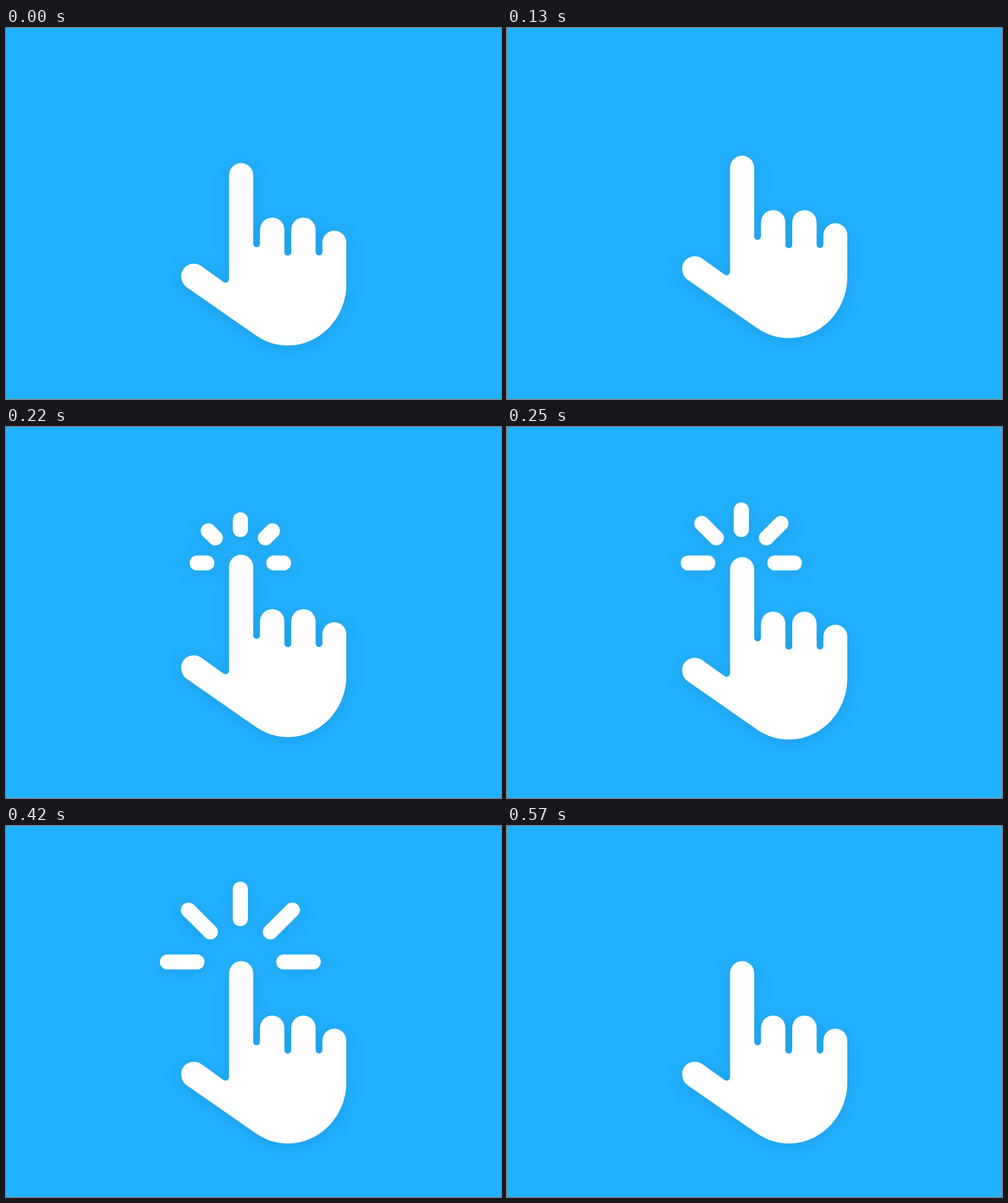
Recreate the animation shown at these times as an HTML page. Size 800 by 600 pixels, loop 1.37 s.

```html
<!DOCTYPE html>
<html lang="en">
<head>
<meta charset="utf-8">
<title>Tap</title>
<style>
html, body { margin: 0; width: 100%; height: 100%; overflow: hidden; background: #22b1ff; }
svg { display: block; width: 100%; height: 100%; }
.art { fill: #fff; filter: drop-shadow(0 4px 14px rgba(0, 10, 40, .11)); }
.hand { animation: press 1370ms step-end infinite; }

/* --n: length step, --m: outward shift, --q: inner end trimmed */
.rays { --n: 0; --m: 0; --q: 0; opacity: 0; animation: burst 1370ms step-end infinite; }
.rays rect {
  --len: calc(8px + 16px * var(--n));
  --in: calc(42px + 8px * var(--m) + 16px * var(--q));
  x: -12.2px;
  width: 24.4px;
  y: calc(0px - var(--in) - var(--len));
  height: var(--len);
  rx: min(12px, var(--len) / 2);
}
.rays .diag {
  --len: calc(6.3px + 17px * var(--n));
  --in: calc(45.2px + 5.65px * var(--m) + 17px * var(--q));
}

@keyframes press {
  0% { transform: translateY(0); }
  5.109% { transform: translateY(-4px); }
  7.299% { transform: translateY(-8px); }
  9.489% { transform: translateY(-12px); }
  18.248% { transform: translateY(-8px); }
  23.357% { transform: translateY(-4px); }
  28.467%, 100% { transform: translateY(0); }
}
@keyframes burst {
  0% { opacity: 0; --n: 0; --m: 0; --q: 0; }
  11.678% { opacity: 1; --n: 0; --m: 0; --q: 0; }
  13.868% { opacity: 1; --n: 1; --m: 0; --q: 0; }
  16.058% { opacity: 1; --n: 2; --m: 0; --q: 0; }
  18.248% { opacity: 1; --n: 3; --m: 0; --q: 0; }
  23.357% { opacity: 1; --n: 4; --m: 0; --q: 0; }
  28.467% { opacity: 1; --n: 4; --m: 1; --q: 0; }
  30.656% { opacity: 1; --n: 4; --m: 2; --q: 0; }
  32.846% { opacity: 1; --n: 3; --m: 2; --q: 1; }
  35.036% { opacity: 1; --n: 2; --m: 2; --q: 2; }
  37.226% { opacity: 1; --n: 1; --m: 2; --q: 3; }
  39.416% { opacity: 1; --n: 0; --m: 2; --q: 4; }
  41.605%, 100% { opacity: 0; --n: 0; --m: 2; --q: 4; }
}
</style>
</head>
<body>
<svg viewBox="0 0 800 600">
  <g class="art">
    <g class="rays">
      <g transform="translate(378.75 219.9)">
        <rect transform="rotate(-90)"/>
        <rect class="diag" transform="rotate(-45)"/>
        <rect/>
        <rect class="diag" transform="rotate(45)"/>
        <rect transform="rotate(90)"/>
      </g>
    </g>
    <path class="hand" d="M360.5 238
      a19.5 19.5 0 0 1 39 0 V349 a5.5 5.5 0 0 0 11 0
      V326.3 a19.7 19.7 0 0 1 39.4 0 V362.5 a5.55 5.55 0 0 0 11.1 0
      V326.3 a19.7 19.7 0 0 1 39.4 0 V362.3 a5.5 5.5 0 0 0 11 0
      V347 a19.3 19.3 0 0 1 38.6 0 V415
      C550 468 508 513.5 456 513.5
      C437 513.5 420 508 404 497.2
      L292 419.3
      C286 415 283.2 408 283.2 401
      C283.2 390 292 381.4 303 381.2
      C308 381.1 312 382.4 316 385.2
      L351.5 410.8
      C355.5 413.6 360.5 410.5 360.5 406 Z"/>
  </g>
</svg>
</body>
</html>
```
